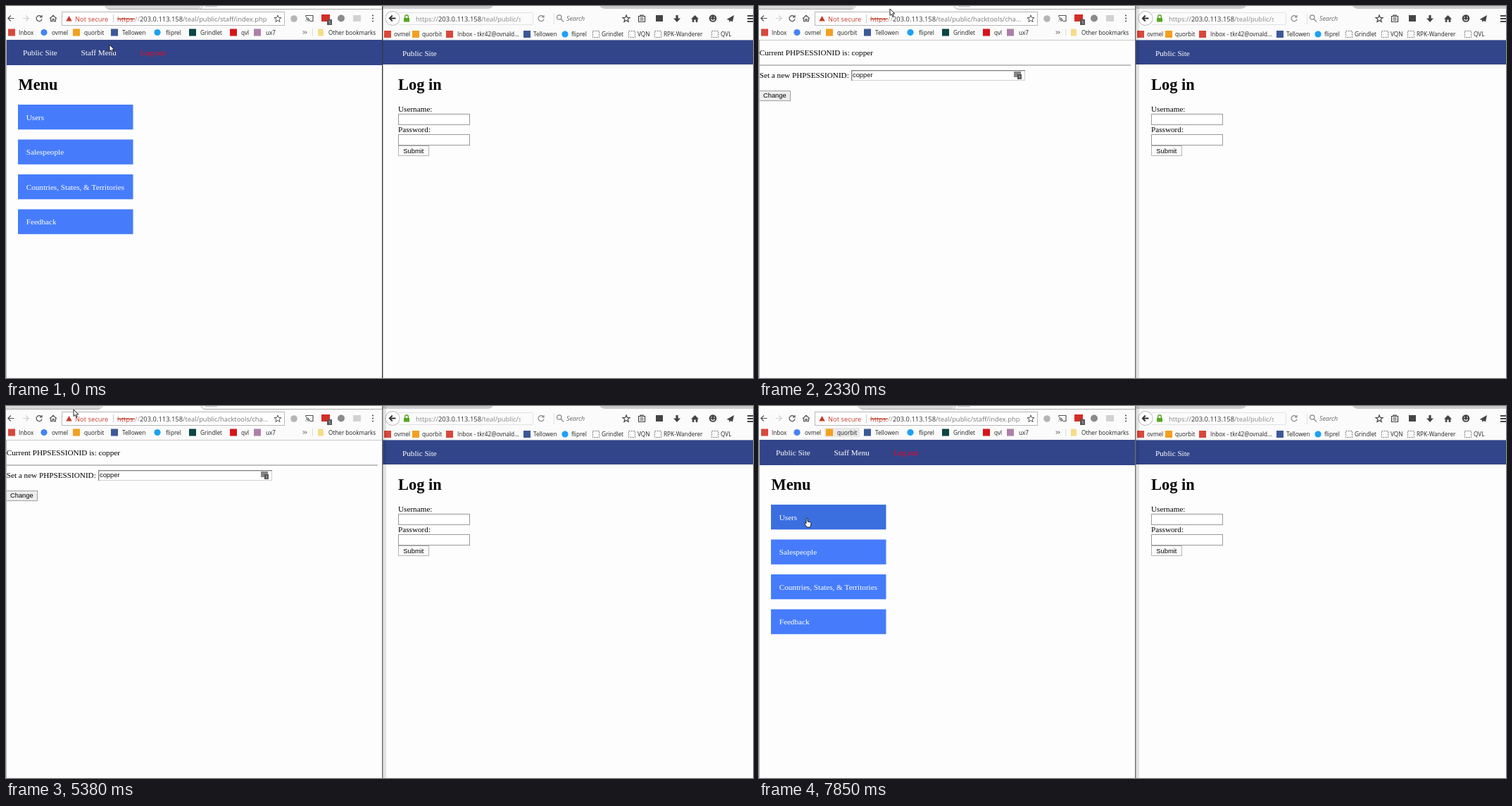
These frames come from a looping animation (1061x528 px, 7.99 s). An HTML page with a canvas:

```html
<!DOCTYPE html>
<html lang="en">
<head>
<meta charset="utf-8">
<title>Two browser windows</title>
<style>
html, body { margin: 0; width: 100%; height: 100%; overflow: hidden; background: #fff; }
canvas { display: block; width: 1061px; height: 528px; }
</style>
</head>
<body>
<canvas id="stage" width="1061" height="528"></canvas>
<script>
const ctx = document.getElementById('stage').getContext('2d');
const LOOP = 7990;
const SERIF = '"Liberation Serif", serif';
const ARIAL = '"Liberation Sans", sans-serif';
const UI = '"Open Sans", sans-serif';
const NAVY = '#32458a', INK = '#444', BAR = '#fbfbfb', PAGE = '#fdfdfd';
const HOST = '203.0.113.158';
const URL_SIZE = 9.4, MARK_SIZE = 8.2;

function box(x, y, w, h, fill) {
  ctx.fillStyle = fill;
  ctx.fillRect(x, y, w, h);
}

function frame(x, y, w, h, stroke, fill) {
  if (fill) box(x, y, w, h, fill);
  ctx.lineWidth = 1;
  ctx.strokeStyle = stroke;
  ctx.strokeRect(x + .5, y + .5, w - 1, h - 1);
}

function text(str, x, y, size, font, fill = '#000', style = '') {
  ctx.font = `${style} ${size}px ${font}`;
  ctx.fillStyle = fill;
  ctx.fillText(str, x, y);
}

function dot(x, y, r, fill) {
  ctx.beginPath();
  ctx.arc(x, y, r, 0, 7);
  ctx.fillStyle = fill;
  ctx.fill();
}

// SVG path data placed at (x, y); either colour may be left out
function shape(d, x, y, stroke, fill, width = 1.2) {
  const path = new Path2D(d);
  ctx.save();
  ctx.translate(x, y);
  ctx.lineWidth = width;
  if (fill) { ctx.fillStyle = fill; ctx.fill(path); }
  if (stroke) { ctx.strokeStyle = stroke; ctx.stroke(path); }
  ctx.restore();
}

const ICON = {
  back: 'M4.5 0H-4M-.2 -4L-4.2 0L-.2 4',
  forward: 'M-4.5 0H4M.2 -4L4.2 0L.2 4',
  reload: 'M3 -2.6A4 4 0 1 0 4 1M4 -4.6V-1.6H1',
  home: 'M-5 .5L0 -4.2L5 .5M-3.4 0V4.2H-1V1H1V4.2H3.4V0',
  homeSolid: 'M-5.5 .5L0 -5L5.5 .5H3.8V5H1.2V1.5H-1.2V5H-3.8V.5Z',
  star: 'M0 -5L1.4 -1.6L5 -1.4L2.2 .9L3.1 4.5L0 2.5L-3.1 4.5L-2.2 .9L-5 -1.4L-1.4 -1.6Z',
  cast: 'M-5 -2V-4H5V4H1M-5 4.2V3.2M-5 1A3.2 3.2 0 0 1 -1.8 4.2M-5 -1A5.2 5.2 0 0 1 .2 4.2',
  warn: 'M0 -4L4.2 3.5H-4.2Z',
  chevrons: 'M-2 -2L0 0L-2 2M1 -2L3 0L1 2',
  folder: 'M-4 -5H3L4 -3V5H-4Z',
  down: 'M-1.6 -5H1.6V-.5H5L0 5L-5 -.5H-1.6Z',
  plane: 'M5 -5L-5.5 1L-2.2 2L-1.4 5L.3 3L3 4.5Z',
  clip: 'M-4.5 -3.5H4.5V4.5H-4.5ZM-2 -5H2V-3.5H-2ZM-2.5 -.8H2.5M-2.5 1.8H2.5'
};

function tabs(menu) {
  const x0 = menu ? 142 : 0, x1 = menu ? 277 : 135;
  box(0, 0, 534, 5, '#fff');
  shape(`M${x0} 0H${x1}L${x1 - 3} 4.5H${x0 + (menu ? 4 : 0)}Z`, 0, 0, null, '#d9d9d9');
  const line = menu
    ? 'M141 0Q143 4.5 147 4.5H534M279 0L276 4.5'
    : 'M0 4.5H131Q135 4 137 0M277 0Q279 4.5 283 4.5H534';
  shape(line, 0, 0, '#aaa', null, 1);
  box(283, 0, 17, 1.5, '#cfcfcf');
}

const LEFT_MARKS = [
  ['Inbox', 18, 3, '#d9483b'], ['ovmel', 65, 49, '#4285f4', 1],
  ['quorbit', 111, 95, '#f2a01e'], ['Tellowen', 165, 149, '#3b5998'],
  ['fliprel', 227, 210, '#1da1f2', 1], ['Grindlet', 276, 260, '#0b4545'],
  ['qvl', 334, 318, '#d61518'], ['ux7', 369, 352, '#ad7fa8']
];
const RIGHT_MARKS = [
  ['ovmel', 551, 537, '#d9483b'], ['quorbit', 591, 577, '#f2a01e'],
  ['Inbox - tkr42@ovnald...', 641, 625, '#d9483b'], ['Tellowen', 749, 735, '#3b5998'],
  ['fliprel', 803, 789, '#1da1f2', 1]
];

function bookmarks(list, y) {
  for (const [name, x, ix, color, round] of list) {
    if (round) dot(ix + 5, y, 4.6, color);
    else box(ix, y - 5, 10, 10, color);
    text(name, x, y + 3, MARK_SIZE, UI, '#222');
  }
}

function leftBrowser(menu, hover) {
  box(0, 5, 534, 43, BAR);
  tabs(menu);
  if (hover) box(hover[0], 31, hover[1], 13, '#e9e9e9');
  shape(ICON.back, 7, 17.5, '#555');
  shape(ICON.forward, 28, 17.5, '#d0d0d0');
  shape(ICON.reload, 47, 17.5, '#555');
  shape(ICON.home, 67, 17.5, '#555');
  frame(79, 8, 317, 20, '#b8b8b8', '#fff');
  shape(ICON.warn, 89.5, 18, null, '#c53929');
  text('Not secure', 98, 21.5, URL_SIZE, UI, '#c53929');
  box(152, 12, 1, 12, '#ccc');
  text('https:', 158, 21.5, URL_SIZE, UI, '#c53929');
  box(158, 18, 25, 1, '#c53929');
  text('//', 183, 21.5, URL_SIZE, UI, '#999');
  text(HOST, 190, 21.5, URL_SIZE, UI, '#333');
  const path = menu ? '/teal/public/staff/index.php' : '/teal/public/hacktools/cha...';
  text(path, 190 + ctx.measureText(HOST).width, 21.5, URL_SIZE, UI, '#777');
  shape(ICON.star, 386, 18, '#555', null, 1);
  dot(409, 18, 4.8, '#b5b5b5');
  shape(ICON.cast, 431, 17.5, '#555');
  box(448, 12, 12, 10, '#d32d27');
  box(456, 19, 7, 8, '#555');
  text('1', 458, 25.5, 6.5, UI, '#fff');
  dot(476, 17.5, 5, '#8b8b8b');
  box(493, 13, 11, 9, '#d2d2d2');
  for (const y of [13.5, 17.5, 21.5]) dot(521, y, 1, '#444');
  bookmarks(LEFT_MARKS, 37.5);
  shape(ICON.chevrons, 424, 37.5, '#333', null, 1);
  box(435, 32, 1, 11, '#ddd');
  shape(ICON.folder, 447, 37.5, null, '#f6dc83');
  text('Other bookmarks', 458, 40.5, MARK_SIZE, UI, '#222');
}

function menuPage(hoverUsers) {
  box(0, 48, 534, 36, NAVY);
  text('Public Site', 24, 70, 11.2, SERIF, '#fff');
  text('Staff Menu', 106.5, 70, 11.2, SERIF, '#fff');
  text('Log out', 191, 70, 11.2, SERIF, '#ff0018');
  text('Menu', 17.5, 119, 22.4, SERIF, '#000', 'bold');
  ['Users', 'Salespeople', 'Countries, States, & Territories', 'Feedback'].forEach((name, i) => {
    const y = 140 + i * 49.5;
    box(17, y, 163.5, 35.3, i === 0 && hoverUsers ? '#3b6fe0' : '#467cfc');
    text(name, 28.7, y + 21.5, 11.2, SERIF, '#fff');
  });
}

function sessionPage(hoverButton) {
  box(0, 48, 534, 1, '#c8c8c8');
  text('Current PHPSESSIONID is: copper', .7, 70, 11.2, SERIF);
  box(0, 83.5, 528, 1, '#858585');
  text('Set a new PHPSESSIONID:', .7, 101.5, 11.2, SERIF);
  frame(131, 91, 247, 15, '#d0d0d0', '#fff');
  box(131, 91, 247, 1.3, '#808080');
  box(131, 91, 1.3, 15, '#808080');
  text('copper', 133, 101.3, 9.33, ARIAL, '#111');
  box(362, 93, 10, 8, '#858585');
  box(367, 97, 6, 7, '#555');
  text('1', 368.5, 103, 6, UI, '#fff');
  frame(0, 120, 45, 15, '#a0a0a0', hoverButton ? '#e3e3e3' : '#ededed');
  text('Change', 6, 130.3, 9.33, ARIAL);
}

function rightBrowser() {
  box(534, 0, 527, 48, BAR);
  shape('M534 0H692Q689 4 684 4H534ZM843 0H1061V4H851Q846 4 843 0Z', 0, 0, null, '#cacaca');
  shape('M558 9.5H748M558 26.5H748M748.5 10V26M778.5 10V26', 0, 0, '#e2e2e2', null, 1);
  dot(549, 17.5, 10.5, '#bbb');
  dot(549, 17.5, 9.6, '#fff');
  shape(ICON.back, 549, 17.5, '#333', null, 1.8);
  box(565, 17, 8, 5.5, '#55a620');
  shape('M-2.3 0V-2A2.3 2.3 0 0 1 2.3 -2V0', 569, 17, '#55a620', null, 1.4);
  ctx.save();
  ctx.beginPath();
  ctx.rect(578, 5, 153, 25);
  ctx.clip();
  text('https://', 582, 21.5, URL_SIZE, UI, '#888');
  const hostX = 582 + ctx.measureText('https://').width;
  text(HOST, hostX, 21.5, URL_SIZE, UI, '#333');
  text('/teal/public/staff', hostX + ctx.measureText(HOST).width, 21.5, URL_SIZE, UI, '#888');
  ctx.restore();
  shape(ICON.reload, 760, 17.5, '#888');
  shape('M1.5 1.5L5 5M2 -1.5A3.2 3.2 0 1 1 -4.4 -1.5A3.2 3.2 0 1 1 2 -1.5', 787, 17.5, '#888');
  text('Search', 796, 21, 8.8, UI, '#666', 'italic');
  shape(ICON.star, 881, 18, INK);
  shape(ICON.clip, 903, 18, INK);
  box(923, 13, 10, 9, INK);
  shape(ICON.down, 953, 18, null, INK);
  shape(ICON.homeSolid, 978.5, 18, null, INK);
  dot(1004, 17.5, 5.3, INK);
  shape('M-2.6 1A2.7 2.7 0 0 0 2.6 1M-2 -2.2V-.8M2 -2.2V-.8', 1004, 17.5, '#fff');
  shape(ICON.plane, 1029, 18, null, INK);
  for (const y of [13, 17, 21]) box(1053, y, 8, 2, INK);
  bookmarks(RIGHT_MARKS, 40);
  ctx.setLineDash([2, 1.3]);
  for (const [name, x] of [['Grindlet', 846], ['VQN', 897], ['RPK-Wanderer', 934], ['QVL', 1015]]) {
    frame(x - 13, 35, 10, 10, '#777');
    text(name, x, 43, MARK_SIZE, UI, '#222');
  }
  ctx.setLineDash([]);

  box(534, 48.4, 527, 34.6, NAVY);
  text('Public Site', 563, 71, 11.2, SERIF, '#fff');
  text('Log in', 557, 119, 22.4, SERIF, '#000', 'bold');
  text('Username:', 557, 150, 11.2, SERIF);
  frame(557, 153, 102, 16, '#9a9a9a', '#fff');
  text('Password:', 557, 179, 11.2, SERIF);
  frame(557, 182, 102, 16, '#9a9a9a', '#fff');
  frame(557, 198, 44, 15, '#b5b5b5', '#fcfcfc');
  text('Submit', 564.3, 209, 9.33, ARIAL);
}

function divider(leftActive) {
  if (leftActive) box(535, 0, 5, 528, 'rgba(0,0,0,.1)');
  box(534, 0, 1.4, 528, leftActive ? '#6c6c6c' : '#383838');
  box(0, 48, 1, 480, '#b4b4b4');
}

// Pointer moves: start, end, number of steps, points passed
const START = [147, 55];
const MOVES = [
  [150, 150, 1, [[141, 61]]],
  [480, 880, 4, [[43, 62]]],
  [1220, 1920, 6, [[110, 50], [165, 36], [186, 4]]],
  [2460, 3300, 6, [[184, 13]]],
  [3450, 3980, 5, [[165, 36], [100, 85], [36, 121]]],
  [4410, 5380, 8, [[70, 75], [96, 5]]],
  [6020, 6200, 2, [[80, 9]]],
  [6540, 6790, 3, [[92, 0]]],
  [7070, 7850, 6, [[115, 36], [90, 100], [67, 159]]]
];

function along(points, u) {
  const s = u * (points.length - 1);
  const i = Math.min(Math.floor(s), points.length - 2);
  return [0, 1].map(k => points[i][k] + (points[i + 1][k] - points[i][k]) * (s - i));
}

function pointerAt(t) {
  let pos = START;
  for (const [t0, t1, steps, via] of MOVES) {
    if (t < t0) break;
    const gap = steps > 1 ? (t1 - t0) / (steps - 1) : 1;
    const done = Math.min(steps, Math.floor((t - t0) / gap + 1e-6) + 1);
    pos = along([pos, ...via], done / steps);
  }
  return pos.map(Math.round);
}

function pointer([x, y], hand) {
  const d = hand
    ? 'M0 1Q1 -.5 2 1V5L6 6Q7.2 6.5 7 8L6 13H1L-2 8.5Q-2.5 7 -1 7L0 8Z'
    : 'M0 0V9.5L2.2 7.5L3.8 11L5.3 10.3L3.8 6.9H6.8Z';
  shape(d, x, y, '#111', '#fff', .9);
}

function draw(t) {
  const menu = t < 2330 || t >= 7070;
  const [x, y] = pointerAt(t);
  const inside = (l, top, r, b) => x >= l && x <= r && y >= top && y <= b;
  const overUsers = menu && inside(17, 140, 180, 175);
  const overLink = menu && (inside(23, 59, 74, 72) || inside(106, 59, 158, 72));
  const leftActive = t >= 480 && t < 6020 || t >= 6540;
  let hover = null;
  if (t >= 1640 && t < 2330 || t >= 3450 && t < 4410) hover = [147, 59];
  else if (t >= 7226) hover = [93, 50];

  box(0, 0, 1061, 528, PAGE);
  rightBrowser();
  leftBrowser(menu, hover);
  if (menu) menuPage(overUsers);
  else sessionPage(inside(0, 119, 45, 135));
  divider(leftActive);
  pointer([x, y], overUsers || overLink);
}

function tick() {
  draw(performance.now() % LOOP);
  requestAnimationFrame(tick);
}
tick();
</script>
</body>
</html>
```
